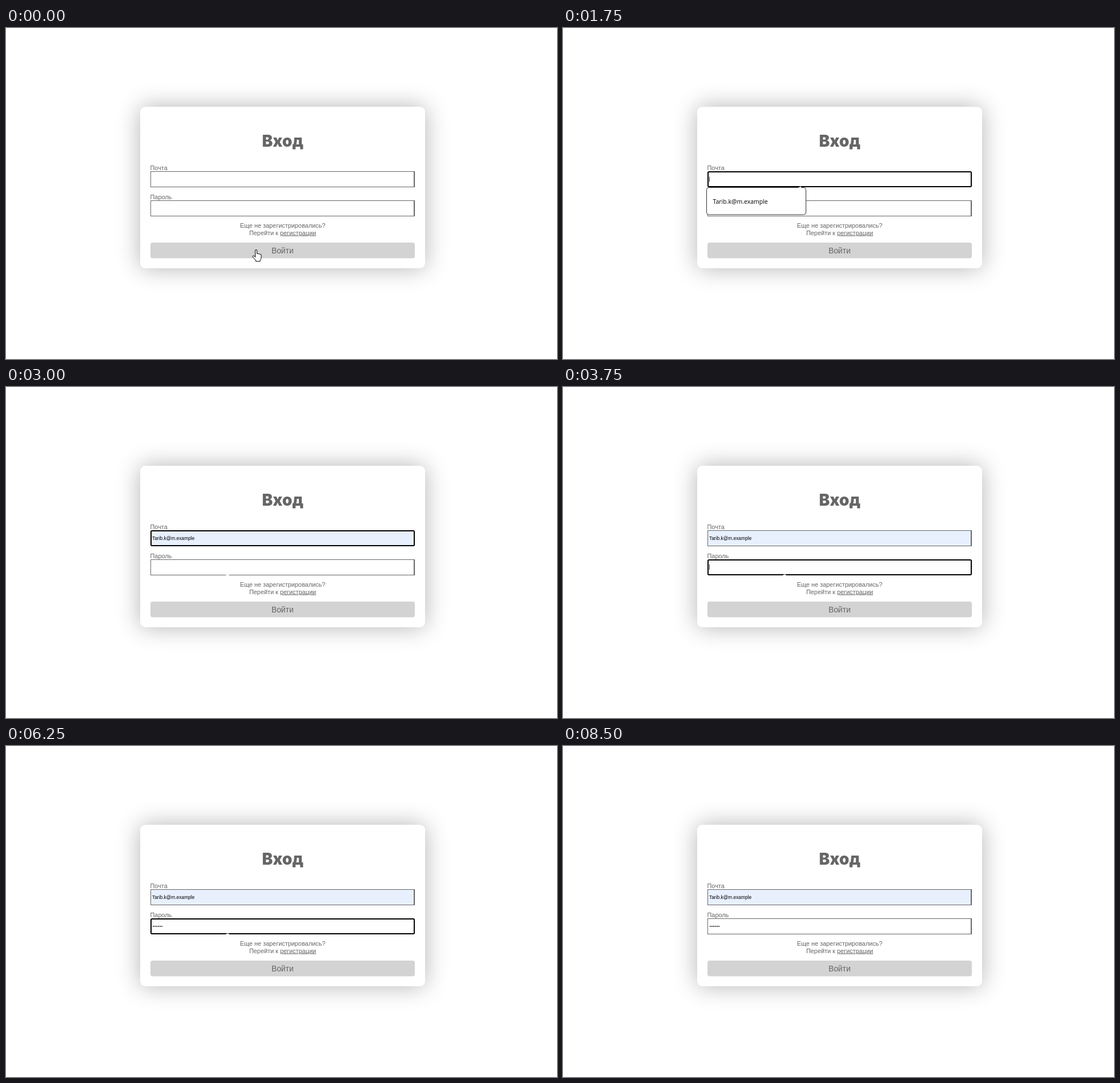
Animation of 965x580 px, one loop 9 s. Source, as an HTML page:

```html
<!DOCTYPE html>
<html lang="ru">
<head>
<meta charset="utf-8">
<style>
  html, body { margin: 0; width: 100%; height: 100%; overflow: hidden; background: #fff; }
  .card {
    position: absolute; left: 234.5px; top: 138px; width: 499.5px; height: 283px;
    border-radius: 9px; background: #fff; box-shadow: 0 0 40px rgba(0, 0, 0, .3);
  }
  svg { position: absolute; left: 0; top: 0; }
  text { font: 10.9px "Liberation Sans", Arial, sans-serif; fill: #666; }
  .mid { text-anchor: middle; }
  .title { font: 900 28px Inter, sans-serif; }
  .button { font-size: 13.8px; }
  .value { font-size: 8.4px; fill: #000; }
  .option { font: 500 10.5px "Open Sans", "Noto Sans", sans-serif; fill: #000; }
  .field rect { fill: #fff; stroke: #666; }
  .field path { stroke: #666; }
  .field.filled rect { fill: #e8f0fe; }
  .field.focus rect { stroke: #000; stroke-width: 2; }
  .field.focus path { display: none; }
  .shape { fill: #fff; stroke: #000; stroke-linejoin: round; }
</style>
</head>
<body>
<div class="card"></div>
<svg width="965" height="580">
  <text class="mid title" x="484.7" y="208">Вход</text>
  <text x="252.5" y="249">Почта</text>
  <text x="252.5" y="299.7">Пароль</text>

  <g class="field" id="mail">
    <rect/><path d="M714.5 252V278"/>
    <text class="value" id="mailText" x="256" y="268"></text>
  </g>
  <g class="field" id="pass" transform="translate(0 51)">
    <rect/><path d="M714.5 252V278"/>
    <g id="dots"></g>
  </g>
  <path id="caret" stroke="#222"/>

  <text class="mid" x="484.5" y="350">Еще не зарегистрировались?</text>
  <text class="mid" x="484.5" y="362.5">Перейти к <tspan text-decoration="underline">регистрации</tspan></text>
  <rect x="253" y="376" width="463" height="27.5" rx="4" fill="#d3d3d3"/>
  <text class="mid button" x="484.3" y="394.5">Войти</text>

  <g id="popup">
    <rect x="251.5" y="279.5" width="174" height="47.5" rx="4" fill="#fff" stroke="#333"/>
    <rect id="row" x="252" y="287" width="173" height="33" fill="#dbe4ee"/>
    <text class="option" x="262.5" y="307.5"></text>
  </g>

  <g id="cursor">
    <path id="arrow" class="shape" d="M.5 .5V15.5L4 12.3 6.5 17.8 8.8 16.8 6.5 11.3H10.8Z"/>
    <path id="hand" class="shape" d="M5.5 13.5V2a1.5 1.5 0 0 1 3 0V7.5q1.5-1 3 .5 1.5-.7 2.5.5 2-.3 2 1.5V14q0 3-2 5V21H6.5V19L1.2 13.2q-.8-2 1.2-2.2 1.6.3 3.1 2.5Z"/>
    <path id="beam" d="M-2.5 .5H2.5M.5 .5V16.5M-2.5 16.5H2.5" stroke="#fff" fill="none"/>
  </g>
</svg>
<script>
const LOOP = 9000, TICK = 250, EMAIL = "Tarib.k@m.example";
const $ = id => document.getElementById(id);
const show = (id, on) => { $(id).style.display = on ? "" : "none"; };

// Pointer: start time, shape, x, y
const pointer = [
  [0, "hand", 431, 388], [250, "beam", 422, 310], [500, "arrow", 412, 279],
  [1000, "beam", 415, 263], [2000, "arrow", 388, 300], [2250, "arrow", 380, 309],
  [2750, "arrow", 384, 328], [3000, "beam", 388, 313],
  [6500, "arrow", 402, 340], [6750, "hand", 430, 383], [7000, "hand", 447, 395],
  [7250, "hand", 461, 383], [8250, "arrow", 501, 542], [8500, "", 0, 0]
];

for (const box of document.querySelectorAll(".field rect"))
  for (const [key, value] of Object.entries({ x: 253.5, y: 251.5, width: 462, height: 27 }))
    box.setAttribute(key, value);
document.querySelector(".option").textContent = EMAIL;
$("dots").innerHTML = Array.from({ length: 6 }, (_, i) =>
  `<circle cx="${258 + 3 * i}" cy="265" r="1.1" fill="#222"/>`).join("");

function setFocus(id, on) {
  const box = $(id).querySelector("rect"), inset = on ? .5 : 0;
  $(id).classList.toggle("focus", on);
  box.setAttribute("x", 253.5 + inset);
  box.setAttribute("y", 251.5 + inset);
  box.setAttribute("width", 462 - 2 * inset);
  box.setAttribute("height", 27 - 2 * inset);
  box.setAttribute("rx", on ? 1.5 : 0);
}

function draw(now) {
  const t = Math.floor(now % LOOP / TICK) * TICK;
  const within = (from, to) => t >= from && t < to;

  const filled = t >= 2000;
  setFocus("mail", within(1250, 3500));
  setFocus("pass", within(3500, 7250));
  $("mail").classList.toggle("filled", filled);
  $("mailText").textContent = filled ? EMAIL : "";

  const typed = Math.max(0, Math.min(6, (t - 4250) / TICK));
  [...$("dots").children].forEach((dot, i) => { dot.style.display = i < typed ? "" : "none"; });

  const inMail = within(1500, 2000) || within(2500, 3000);
  const inPass = within(3750, 4250) || within(4500, 5750);
  show("caret", inMail || inPass);
  const x = inPass ? 256.5 + 3 * typed : filled ? 331.5 : 256.5;
  $("caret").setAttribute("d", `M${x} ${inPass ? 311 : 260.5}v9`);

  const closing = t >= 2500;
  show("popup", within(1500, 2750));
  show("row", t >= 2000);
  $("popup").setAttribute("opacity", closing ? .6 : 1);
  $("popup").setAttribute("transform",
    closing ? "translate(338.5 303) scale(.98) translate(-338.5 -303)" : "");

  const [, shape, px, py] = pointer.filter(step => step[0] <= t).pop();
  for (const name of ["arrow", "hand", "beam"]) show(name, name === shape);
  $("cursor").setAttribute("transform", `translate(${px} ${py})`);
}

const start = performance.now();
(function frame() {
  draw(performance.now() - start);
  requestAnimationFrame(frame);
})();
</script>
</body>
</html>
```
